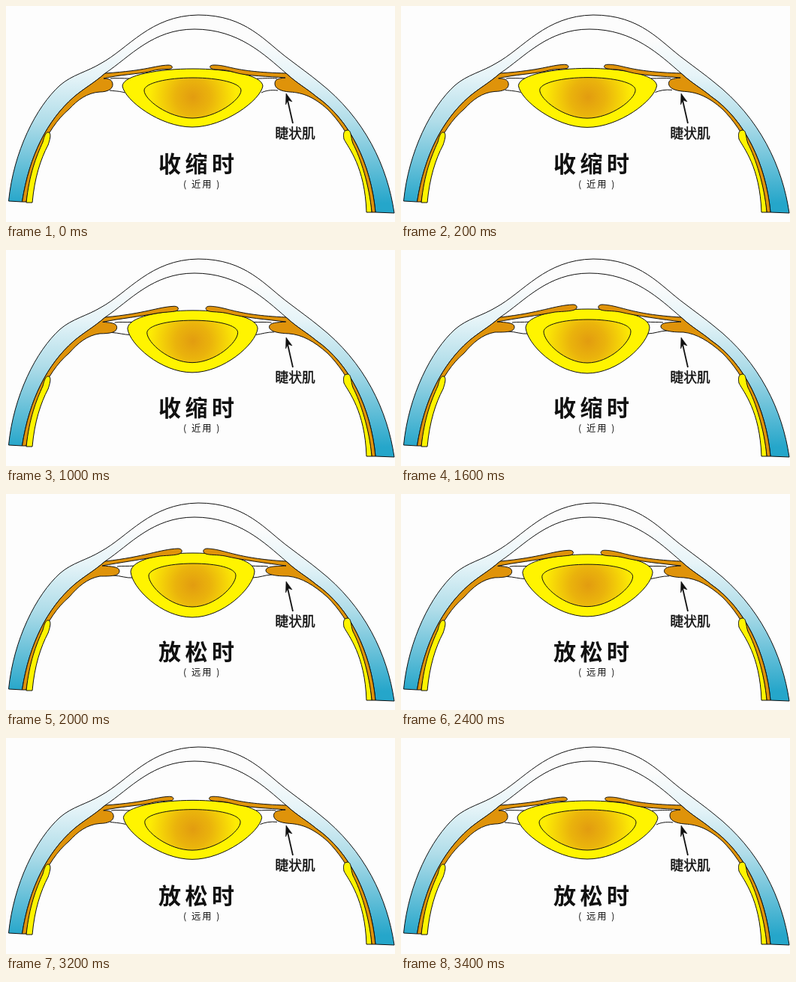
Recreate the animation shown at these times as an HTML page. Size 518 by 289 pixels, loop 3.8 s.

```html
<!DOCTYPE html>
<html lang="zh-CN">
<head>
<meta charset="utf-8">
<style>
html, body { margin: 0; width: 100%; height: 100%; overflow: hidden; background: #fdfdfd; }
svg { display: block; width: 100%; height: 100%; }
path { stroke: #111; stroke-width: 1; stroke-linejoin: round; }
text { font-family: "Noto Sans CJK SC", "Noto Sans CJK", sans-serif; fill: #111; white-space: pre; }
.line { fill: none; }
.muscle { fill: #df930a; }
.yellow { fill: #fff400; }
.arrow { fill: none; stroke-width: 1.8; }
.head { fill: #111; stroke-width: .6; }
.label { font-size: 17.8px; stroke: #111; stroke-width: .4px; }
.title { font-size: 30px; font-weight: 700; letter-spacing: 5.5px; }
.note { font-size: 12.3px; letter-spacing: 2px; }
</style>
</head>
<body>
<svg viewBox="0 0 518 289">
  <defs>
    <linearGradient id="wall" gradientUnits="userSpaceOnUse" x1="0" y1="45" x2="0" y2="264">
      <stop offset="0" stop-color="#fcfcfc"/>
      <stop offset=".22" stop-color="#e6f4f8"/>
      <stop offset=".5" stop-color="#b0dde9"/>
      <stop offset="1" stop-color="#25a6ca"/>
    </linearGradient>
    <radialGradient id="core" gradientUnits="userSpaceOnUse" cx="249" cy="122" r="58">
      <stop offset="0" stop-color="#e29c10"/>
      <stop offset=".4" stop-color="#eab30c"/>
      <stop offset="1" stop-color="#fdec04"/>
    </radialGradient>
  </defs>

  <path fill="url(#wall)" d="M3.500,261 C10,195 40,135 72,106 C88,92 108,88 126,77 C163,57 192,13 256,12 C320,12 345,48 378,72 C391,82 405,92 417,102 C478,150 508,215 517,277 L492,276 C486,212 458,152 413,121 C400,110 388,104 373,90 C345,66 310,31 251,31 C195,31 165,68 132,90 C116,104 104,110 90,122 C55,153 31,200 21.500,262 Z"/>
  <g id="moving"></g>
  <path class="yellow" d="M27,263 C31,225 40,202 49,182 C51,174 53,168 57,169 C61,171 58,180 56,186 C46,205 38,230 35,263 Z"/>
  <path class="yellow" d="M487,276 C484,240 472,203 462,184 C459,176 460,166 455,166 C449,166 449,172 450,178 C456,190 478,215 480,276 Z"/>

  <path class="arrow" d="M382,157 L375,126"/>
  <path class="head" d="M373,117 L381,128 L375.500,126 L372.500,132 Z"/>
  <text class="label" x="358.500" y="176.500">睫状肌</text>
  <text class="title" id="title" x="203" y="222"></text>
  <text class="note" id="note" x="236" y="242.500"></text>
</svg>
<script>
// Each part: class, fill, path when near, path when far.
const parts = [
  ["line", "", "M139,97 C147,96 155,97 164,97 M138,113 C147,114 152,114 158,116",
    "M148,97 C155,96 162,97 171,96 M143,109 C152,109 160,113 170,112"],
  ["line", "", "M361,97 C352,96 345,97 334,97 M362,113 C353,112 346,113 340,116",
    "M349,97 C342,96 335,97 326,96 M354,108 C346,108 337,112 328,112"],
  ["yellow", "", "M155,107 C156,92 205,84 249,84 C293,84 341,92 342,107 C339,126 291,162 248,162 C205,162 158,126 155,107 Z",
    "M166,104 C167,88 205,79 249,79 C293,79 331,88 331,104 C329,126 289,165 248,165 C207,165 168,126 166,104 Z"],
  ["", "url(#core)", "M184,113 C184,103 215,96 249,96 C283,96 313,103 313,113 C313,125 280,150 248,150 C216,150 184,125 184,113 Z",
    "M190,109 C191,100 215,93 249,93 C281,93 306,99 306,109 C306,123 278,151 248,151 C218,151 190,123 190,109 Z"],
  ["muscle", "", "M132,90 C116,104 104,110 90,122 C55,153 31,200 21.5,262 L27,262 C34,215 52,165 84,138 C95,126 108,116 125,115 C135,115 143,111 142,104 C141,98 136,97 130,97 C150,92 176,91 190,88 C202,84 214,85 219,84 C223,83 222,79 216,79 C196,80 190,86 132,90 Z",
    "M132,90 C116,104 104,110 90,122 C55,153 31,200 21.5,262 L27,262 C34,215 52,165 84,138 C96,124 108,113 125,110 C140,110 151,110 151,103 C151,97 140,97 128,96 C150,92 185,87 205,83 C217,82 226,82 231,80 C236,78 235,73 229,73 C205,74 185,84 132,90 Z"],
  ["muscle", "", "M373,90 C388,104 400,110 413,121 C458,152 486,212 492,276 L487,276 C480,215 458,168 428,138 C410,122 396,116 378,115 C365,114 358,110 358,104 C358,98 362,97 372,96 C350,94 322,94 305,89 C290,84 280,86 274,84 C270,82 271,79 277,79 C298,79 300,88 373,90 Z",
    "M373,90 C388,104 400,110 413,121 C458,152 486,212 492,276 L487,276 C480,215 458,168 428,138 C410,122 394,112 376,110 C360,110 346,108 346,102 C347,96 360,97 373,96 C350,93 312,88 292,83 C282,81 271,82 266,80 C261,78 262,73 268,73 C292,74 305,86 373,90 Z"]
];

const STEP = 200, LOOP = 3800, LAST = 17;
const byId = id => document.getElementById(id);

const shapes = parts.map(([cls, fill, near, far]) => {
  const el = document.createElementNS("http://www.w3.org/2000/svg", "path");
  if (cls) el.setAttribute("class", cls);
  if (fill) el.setAttribute("fill", fill);
  byId("moving").append(el);
  return { el, near, ends: far.match(/[\d.]+/g).map(Number) };
});

// Rise in eight steps, rest, then skip one step on the way back.
function pose(step) {
  if (step <= 8) return step / 8;
  return step <= 10 ? 1 : (LAST - step) / 8;
}

let shown = -1;
function draw(now) {
  const step = Math.min(LAST, Math.floor(now % LOOP / STEP));
  if (step !== shown) {
    shown = step;
    const p = pose(step);
    for (const { el, near, ends } of shapes) {
      let i = 0;
      el.setAttribute("d", near.replace(/[\d.]+/g, n => (+n + (ends[i++] - n) * p).toFixed(2)));
    }
    const tense = step < 9;
    byId("title").textContent = tense ? "收缩时" : "放松时";
    byId("note").textContent = tense ? "( 近用 )" : "( 远用 )";
  }
}

const start = performance.now();
function tick() {
  draw(performance.now() - start);
  requestAnimationFrame(tick);
}
tick();
</script>
</body>
</html>
```
